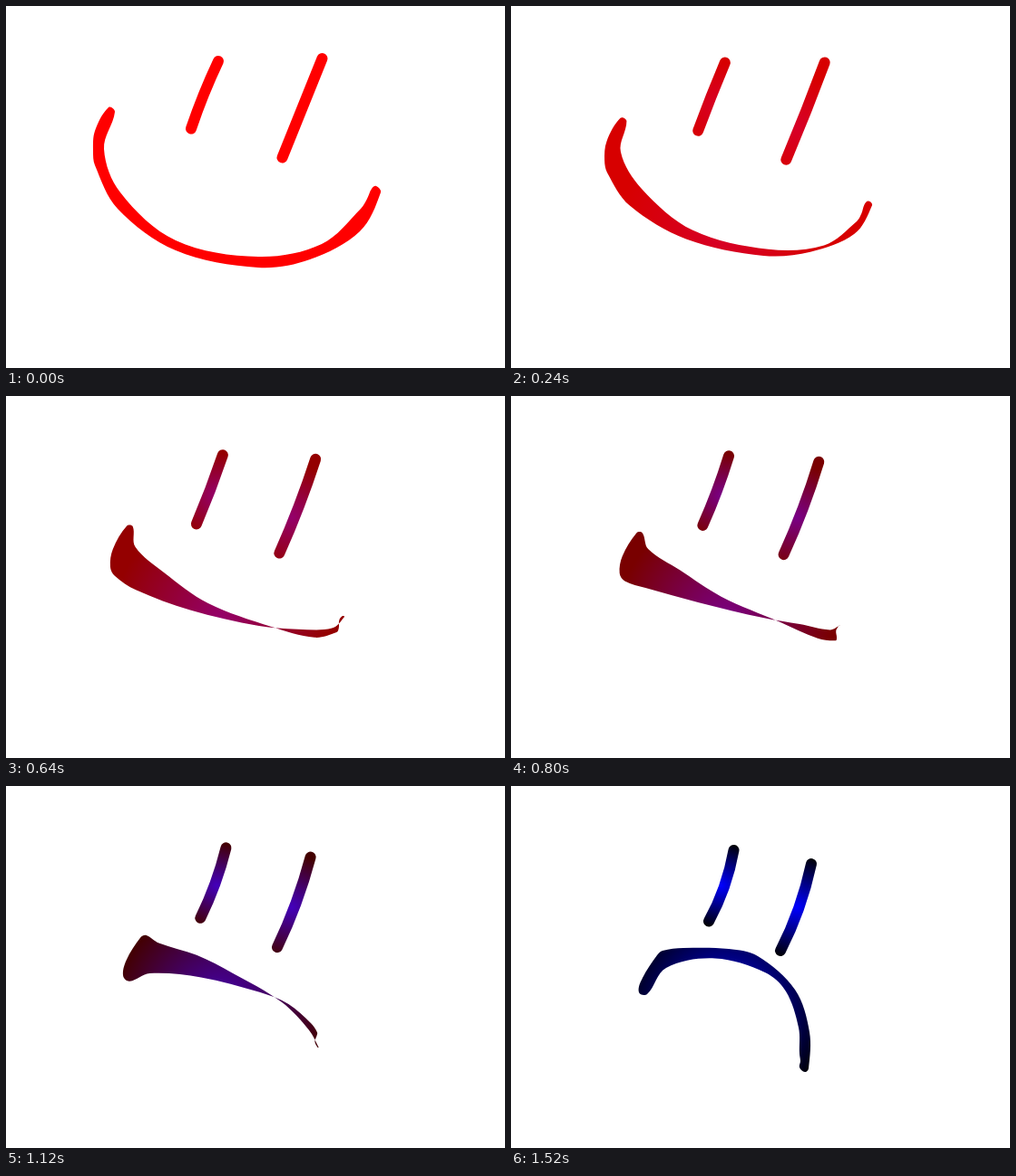
These frames come from a looping animation (550x400 px, 1.6 s). An HTML page with a canvas:

```html
<!DOCTYPE html>
<html>
<head>
<meta charset="utf-8">
<title>Smile to frown</title>
<style>
  html, body { margin: 0; width: 100%; height: 100%; overflow: hidden; background: #fff; }
  canvas { display: block; }
</style>
</head>
<body>
<canvas id="stage" width="550" height="400"></canvas>
<script>
const ctx = document.getElementById('stage').getContext('2d');
const STEP = 80, STEPS = 20, EYE_WIDTH = 12;

// Key points: [happy x, happy y, sad x, sad y]
// An eye is a brush stroke: top, bend, bottom
const leftEye = [[234,61,245.5,71], [217,97,238,113], [204,135.5,218,149.5]];
const rightEye = [[348.5,58,331,86], [327,112,320,137], [304.5,167.5,297,182]];

// The mouth is an outline: upper edge, right tip, lower edge, left side
const mouth = [
  [113,112,161,187], [120,117,167,182], [108,158,190,179], [126,206,240,180],
  [187,259,272,188], [278,277,313,225], [348,263,329,272], [391,224,328,312],
  [398,213,324,316], [403,202,318,311], [408,199,319,304], [413,206,318,296],
  [390,249,317,267], [335,280,303,227], [278,289,280,206], [187,270,225,190.5],
  [123,224,171,201], [98,176,150,230], [96,160,141,228], [98,138,145,212]
];

const mix = (a, b, k) => a + (b - a) * k;
const pose = (points, k) =>
  points.map(([x0, y0, x1, y1]) => [mix(x0, x1, k), mix(y0, y1, k)]);

function paint(x, y, radius, k) {
  const red = Math.round(255 * (1 - k)), blue = Math.round(255 * k);
  const gradient = ctx.createRadialGradient(x, y, 0, x, y, radius);
  gradient.addColorStop(0, `rgb(${red},0,${blue})`);
  gradient.addColorStop(1, `rgb(${red},0,0)`);
  return gradient;
}

// Smooth closed curve whose handles follow the length of each segment
function traceClosed(points) {
  const n = points.length;
  const at = i => points[(i + n) % n];
  const tangent = i => {
    const [ax, ay] = at(i - 1), [bx, by] = at(i + 1);
    const length = Math.hypot(bx - ax, by - ay) || 1;
    return [(bx - ax) / length, (by - ay) / length];
  };
  ctx.beginPath();
  ctx.moveTo(...at(0));
  for (let i = 0; i < n; i++) {
    const [ax, ay] = at(i), [bx, by] = at(i + 1);
    const [ux, uy] = tangent(i), [vx, vy] = tangent(i + 1);
    const h = Math.hypot(bx - ax, by - ay) / 3;
    ctx.bezierCurveTo(ax + ux * h, ay + uy * h, bx - vx * h, by - vy * h, bx, by);
  }
  ctx.closePath();
}

function drawEye(points, k, x, y, radius) {
  const [top, bend, bottom] = pose(points, k);
  ctx.strokeStyle = paint(x, y, radius, k);
  ctx.beginPath();
  ctx.moveTo(...top);
  ctx.quadraticCurveTo(...bend, ...bottom);
  ctx.stroke();
}

function drawMouth(k) {
  ctx.fillStyle = paint(236, 247, 118, k);
  traceClosed(pose(mouth, k));
  ctx.fill();
}

function draw() {
  const k = Math.floor(performance.now() / STEP) % STEPS / (STEPS - 1);
  ctx.clearRect(0, 0, 550, 400);
  ctx.lineCap = 'round';
  ctx.lineWidth = EYE_WIDTH;
  drawEye(leftEye, k, 232, 110, 48);
  drawEye(rightEye, k, 315, 134, 58);
  drawMouth(k);
  requestAnimationFrame(draw);
}
draw();
</script>
</body>
</html>
```
